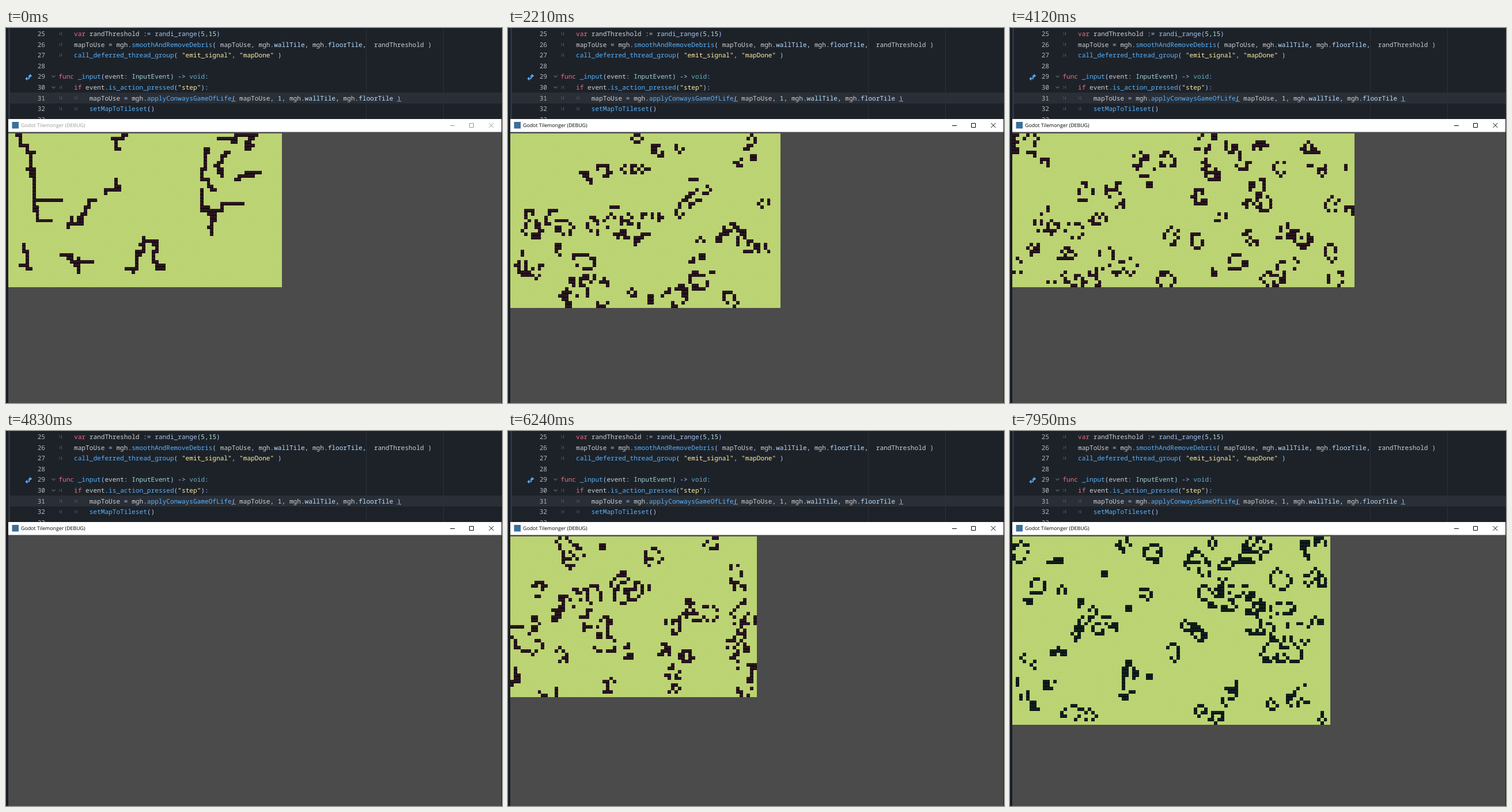
Animation of 861x651 px, one loop 8 s. Source, as an HTML page with a canvas:

```html
<!DOCTYPE html>
<html lang="en">
<head>
<meta charset="utf-8">
<title>Map generator</title>
<style>
html, body { margin: 0; width: 100%; height: 100%; overflow: hidden; background: #1d2229; }
svg, canvas { position: absolute; left: 0; top: 0; }
text { white-space: pre; text-rendering: geometricPrecision; }
.code { font: 11.13px "Noto Sans Mono", monospace; fill: #cdcfd2; }
.num { fill: #b4b8be; }
.k { fill: #ee6b7e; } .f { fill: #57b3ff; } .s { fill: #ffeda1; } .p { fill: #abc9ff; }
.m { fill: #bce0ff; } .g { fill: #a5c3f0; } .n { fill: #b5e6dc; } .t { fill: #9fd0d6; } .v { fill: #62b1c6; }
.u { text-decoration: underline; }
.line { fill: none; stroke: #555c66; }
#bar { fill: #999; stroke: #999; }
#bar.on { fill: #000; stroke: #000; }
#bar text { font: 8.8px "Open Sans", sans-serif; stroke: none; }
#bar path { fill: none; }
</style>
</head>
<body>
<svg width="861" height="651">
  <defs><path id="tab" class="line" d="M0-2.5l2.5 2.5-2.5 2.5M4.5-3v6"/></defs>
  <rect width="4" height="651" fill="#191d25"/>
  <rect x="4" width="3" height="158" fill="#303641"/>
  <rect x="7" y="112" width="854" height="19" fill="#2a2f37"/>
  <path d="M625.5 0v158M759.5 0v158" stroke="#2b3139"/>
  <g class="code num" id="nums"></g>
  <path d="M79.5 82.5l3 3 3-3M79.5 101.5l3 3 3-3" class="line" stroke-width="1.5"/>
  <path d="M35 88h5v-5h3M41 80.5l3 2.5-3 2.5M37 85.5l-2.5 2.5 2.5 2.5" fill="none" stroke="#5fb2ff" stroke-width="1.6"/>
  <g id="tabs"></g>
  <g class="code">
    <text x="118" y="14"><tspan class="k">var</tspan> randThreshold <tspan class="p">:=</tspan> <tspan class="g">randi_range</tspan><tspan class="p">(</tspan><tspan class="n">5</tspan><tspan class="p">,</tspan><tspan class="n">15</tspan><tspan class="p">)</tspan></text>
    <text x="118" y="32.6">mapToUse <tspan class="p">=</tspan> mgh<tspan class="p">.</tspan><tspan class="f">smoothAndRemoveDebris</tspan><tspan class="p">(</tspan> mapToUse<tspan class="p">,</tspan> mgh<tspan class="m">.wallTile,</tspan> mgh<tspan class="m">.floorTile,</tspan>  randThreshold <tspan class="p">)</tspan></text>
    <text x="118" y="51.2"><tspan class="f">call_deferred_thread_group</tspan><tspan class="p">(</tspan> <tspan class="s">"emit_signal"</tspan><tspan class="p">,</tspan> <tspan class="s">"mapDone"</tspan> <tspan class="p">)</tspan></text>
    <text x="91.3" y="88.4"><tspan class="k">func</tspan> <tspan class="f">_input</tspan><tspan class="p">(</tspan>event<tspan class="p">:</tspan> <tspan class="t">InputEvent</tspan><tspan class="p">) -&gt;</tspan> <tspan class="v">void</tspan><tspan class="p">:</tspan></text>
    <text x="118" y="107"><tspan class="k">if</tspan> event<tspan class="p">.</tspan><tspan class="f">is_action_pressed</tspan><tspan class="p">(</tspan><tspan class="s">"step"</tspan><tspan class="p">):</tspan></text>
    <text x="144.7" y="125.6">mapToUse <tspan class="p">=</tspan> mgh<tspan class="p">.</tspan><tspan class="f">applyConwaysGameOfLife</tspan><tspan class="p u">(</tspan> mapToUse<tspan class="p">,</tspan> <tspan class="n">1</tspan><tspan class="p">,</tspan> mgh<tspan class="m">.wallTile,</tspan> mgh<tspan class="m">.floorTile</tspan> <tspan class="p u">)</tspan></text>
    <text x="144.7" y="144.2"><tspan class="f">setMapToTileset</tspan><tspan class="p">()</tspan></text>
  </g>
  <rect x="4" y="158" width="856" height="493" fill="#4b4b4b"/>
  <rect x="4" y="158" width="856" height="22.5" fill="#fff"/>
  <rect x="10.5" y="163" width="11.5" height="11.5" fill="#3a6f9c"/>
  <g id="bar">
    <text x="26" y="172.2">Godot Tilemonger (DEBUG)</text>
    <path d="M771 169.5h8M804.5 165.5h7v7h-7zM838.5 165l8 8M846.5 165l-8 8"/>
  </g>
</svg>
<canvas id="stage" width="861" height="651"></canvas>
<script>
const CELL = 5.94, LEFT = 4, TOP = 183, LOOP = 8000;
const PURPLE = ['#170b12', '#4a2537'], TEAL = ['#08120f', '#1b3438'];
const ctx = stage.getContext('2d');

for (let i = 0; i < 9; i++) nums.innerHTML += `<text x="54.7" y="${14 + 18.6 * i}">${25 + i}</text>`;
const addTab = (x, row) => tabs.innerHTML += `<use href="#tab" x="${x}" y="${10 + 18.6 * row}"/>`;
[0, 1, 2, 5, 6, 7].forEach(row => addTab(92, row));
[6, 7].forEach(row => addTab(118.5, row));

function random(seed) {
  return () => {
    seed = seed + 0x6D2B79F5 | 0;
    let t = Math.imul(seed ^ seed >>> 15, 1 | seed);
    t = t + Math.imul(t ^ t >>> 7, 61 | t) ^ t;
    return ((t ^ t >>> 14) >>> 0) / 4294967296;
  };
}

// Wall runs of the first map: start cell, end cell
const walls = [
  [2, 0, 12, 25], [8, 19, 15, 19], [34, 0, 32, 4], [31, 13, 28, 17], [25, 19, 17, 27], [61, 1, 72, 0],
  [71, 0, 69, 4], [58, 4, 60, 16], [64, 5, 62, 12], [56, 16, 59, 29], [67, 20, 58, 27], [66, 13, 73, 11],
  [4, 32, 3, 38], [15, 35, 20, 40], [18, 37, 24, 37], [39, 30, 34, 39], [41, 31, 43, 39]
];

// Each run wanders from its start to its end
function wander({ cols, rows, seed }) {
  const rnd = random(seed), grid = Array(cols * rows).fill(0);
  for (let [x, y, endX, endY] of walls) {
    grid[y * cols + x] = 1;
    while (x != endX || y != endY) {
      const dx = endX - x, dy = endY - y, stray = rnd() < .35;
      const across = rnd() < (stray ? .5 : Math.abs(dx) / (Math.abs(dx) + Math.abs(dy)));
      const step = stray ? (rnd() < .5 ? -1 : 1) : Math.sign(across ? dx : dy);
      if (across) x = Math.min(cols - 1, Math.max(0, x + step));
      else y = Math.min(rows - 1, Math.max(0, y + step));
      grid[y * cols + x] = 1;
    }
  }
  return grid;
}

// Random walls near random centres
function scatter({ cols, rows, seed }) {
  const rnd = random(seed);
  const spots = Array.from({ length: cols * rows * .015 }, () => [rnd() * cols, rnd() * rows]);
  return Array.from({ length: cols * rows }, (_, i) => {
    const x = i % cols, y = (i - x) / cols;
    return spots.some(([u, v]) => Math.hypot(x - u, y - v) < 2.7) && rnd() < .47 ? 1 : 0;
  });
}

function life(grid, cols, rows) {
  return Array.from({ length: cols * rows }, (_, i) => {
    const x = i % cols, y = (i - x) / cols;
    let n = 0;
    for (let v = Math.max(0, y - 1); v <= Math.min(rows - 1, y + 1); v++)
      for (let u = Math.max(0, x - 1); u <= Math.min(cols - 1, x + 1); u++)
        if (u != x || v != y) n += grid[v * cols + u];
    return n == 3 || n == 2 && grid[i] ? 1 : 0;
  });
}

const scenes = [];

// The first time shows the new map, each later one a step of life
function addMap(make, cols, rows, ink, ...times) {
  let grid = make({ cols, rows, seed: times[0] + 7 });
  for (const at of times) {
    scenes.push({ at, cols, rows, ink, grid });
    grid = life(grid, cols, rows);
  }
}

addMap(wander, 80, 45, PURPLE, 0);
addMap(scatter, 79, 51, PURPLE, 500, 1100, 1400, 1700, 2000, 2210, 2410, 2620, 2720);
addMap(scatter, 65, 34, TEAL, 2920, 3120, 3320);
addMap(scatter, 100, 45, PURPLE, 3620, 3920, 4130, 4330, 4530);
addMap(scatter, 0, 0, PURPLE, 4830);
addMap(scatter, 69, 58, TEAL, 4930, 5230, 5430, 5640);
addMap(scatter, 72, 47, PURPLE, 5940, 6240, 6540);
addMap(scatter, 93, 55, TEAL, 6740, 6950, 7250, 7450, 7650, 7950);

function rect(color, x, y, w, h) {
  ctx.fillStyle = color;
  ctx.fillRect(x, y, w, h);
}

function draw({ cols, rows, ink, grid }) {
  ctx.clearRect(0, 0, 861, 651);
  rect('#bcd474', LEFT, TOP, Math.round(cols * CELL), Math.round(rows * CELL));
  grid.forEach((wall, i) => {
    const col = i % cols, row = (i - col) / cols;
    const x = LEFT + col * CELL, y = TOP + row * CELL;
    if (wall) {
      const l = Math.round(x), t = Math.round(y);
      rect(ink[0], l, t, Math.round(x + CELL) - l, Math.round(y + CELL) - t);
      rect(ink[1], l, t + 1, 5, 1);
      rect(ink[1], l + 1, t + 3, 2, 1);
      rect(ink[1], l + 4, t + 3, 2, 1);
    } else {
      rect('#b0ca6a', x + 1, y + 1.5, 1, 1);
      rect('#b0ca6a', x + 4, y + 4, 1, 1);
    }
  });
}

let shown;
function tick() {
  const t = performance.now() % LOOP;
  const scene = scenes.findLast(s => s.at <= t);
  if (scene != shown) draw(shown = scene);
  bar.classList.toggle('on', t >= 100);
  requestAnimationFrame(tick);
}
tick();
</script>
</body>
</html>
```
